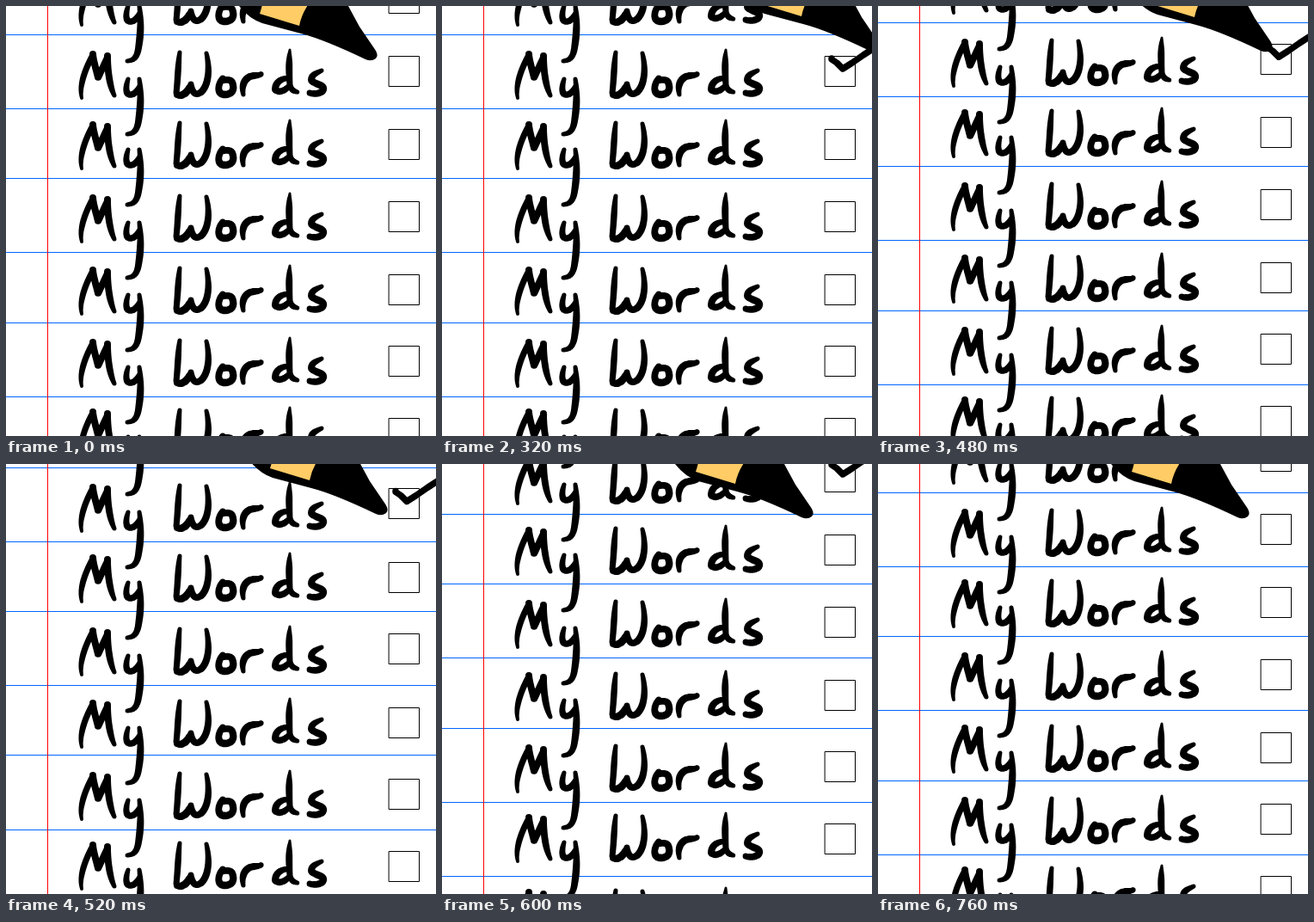
Write an HTML page with a canvas that moves like this. It is 500 px wide and 500 px high and loops after 800 ms.

```html
<!DOCTYPE html>
<html lang="en">
<head>
<meta charset="utf-8">
<title>Checklist</title>
<style>
  html, body { margin: 0; width: 100%; height: 100%; overflow: hidden; background: #fff; }
  canvas { display: block; }
</style>
</head>
<body>
<canvas id="stage" width="500" height="500"></canvas>
<script>
const ctx = document.getElementById('stage').getContext('2d');
const STEP = 40, STEPS = 20, RESET = 19;

const textRows = [-85, 0, 82, 167, 251, 335, 416, 503];
const boxRows = [-26.4, 58, 143.6, 227, 312.6, 395.6, 479.6, 564];
const ruleRows = [-52.4, 33.6, 119.6, 200.6, 286.6, 368, 454.6, 540.6, 621.6];

// Pen offset at each step: approach, tick, return
const penPath = [
  [0, 0], [8, 1], [17, 2], [26, 3], [32, 7], [39, 14], [50, 7], [63, -2],
  [77, -11], [75, -24], [56, -22], [41, -16], [27, -10], [12, -4], [4, -1], [0, 0]
];
const TICK_START = 3, TICK_END = 8;
const TIP = { x: 427, y: 59 };

// Brush strokes: path, then width at start, middle and end
const brush = [
  // M
  ['M88 107 C85 94 91 75 101 57', 4, 7, 7],
  ['M101 56 C102 66 105 74 107 83 C111 75 115 66 118 59', 8, 8, 7],
  ['M118 58 C118 76 121 94 126 104', 8, 8, 5],
  // y
  ['M142 85 C138 98 140 104 146 103 C150 102 153 98 155 94', 5, 7.5, 6],
  ['M155 85 C157 99 157 116 154 134 C152 146 148 148 141 149', 5, 8.5, 5],
  // W
  ['M202 54 C200 68 200 84 198 101', 5, 7.5, 7],
  ['M199 103 C205 106 211 101 215 91', 8, 9, 6],
  ['M215 91 C217 103 222 105 228 99 C236 90 237 72 233 55', 7, 8, 5],
  // o
  ['M252 84 C245 93 246 103 254 103 C264 103 266 96 263 89 C261 85 255 85 249 88', 7, 8.5, 7],
  // r
  ['M276 103 C274 94 276 87 282 83 C287 80 292 82 297 79', 5, 8.5, 6],
  // d
  ['M328 84 C319 84 313 90 313 97 C318 102 325 98 330 92', 6, 8, 6],
  ['M330 51 C329 64 329 78 330 91', 3, 8, 7],
  ['M330 91 C331 97 334 99 339 100', 7, 6.5, 5],
  // s
  ['M367 75 C361 78 355 80 355 86 C359 92 370 91 369 97 C367 102 359 103 353 101', 5, 8.5, 7]
];

const penBody = new Path2D(
  'M225 -40 L271 0 Q283 15 298 20 L343 32 Q370 39 418 62 Q425 65 430 61 ' +
  'Q434 57 428 49 L411 24 L398 0 L385 -40 Z');
const penWood = new Path2D('M295 9 L341 23 Q344 7 356 -8 L365 -30 L300 -30 Q301 -8 295 9 Z');

function paintStroke(g, [d, start, middle, end]) {
  const path = document.createElementNS('http://www.w3.org/2000/svg', 'path');
  path.setAttribute('d', d);
  const length = path.getTotalLength();
  for (let s = 0; s <= length; s += 0.5) {
    const t = s / length;
    const width = t < 0.5
      ? start + (middle - start) * Math.sin(t * Math.PI)
      : end + (middle - end) * Math.sin(t * Math.PI);
    const { x, y } = path.getPointAtLength(s);
    g.moveTo(x + width / 2, y);
    g.arc(x, y, width / 2, 0, 2 * Math.PI);
  }
}

function makeWords() {
  const sheet = document.createElement('canvas');
  sheet.width = 500;
  sheet.height = 160;
  const g = sheet.getContext('2d');
  g.beginPath();
  for (const stroke of brush) paintStroke(g, stroke);
  g.fill();
  return sheet;
}
const words = makeWords();

function scrollAt(step) {
  if (step < 12 || step >= RESET) return 0;
  return -Math.min(29.5 + (step - 13) * 15.75, 84.5);
}

function drawRules(scroll) {
  ctx.fillStyle = '#0066ff';
  for (const y of ruleRows) ctx.fillRect(0, Math.floor(y + scroll), 500, 1);
  ctx.fillStyle = '#ff0000';
  ctx.fillRect(48, 0, 1, 500);
}

function drawTick(step, scroll) {
  if (step < TICK_START || step >= RESET) return;
  const points = penPath.slice(TICK_START, Math.min(step, TICK_END) + 1);
  ctx.lineWidth = 7.5;
  ctx.beginPath();
  ctx.moveTo(TIP.x + 26, TIP.y + 2 + scroll);
  for (const [x, y] of points) ctx.lineTo(TIP.x + x, TIP.y + y + scroll);
  ctx.stroke();
}

function drawPen(step) {
  const [x, y] = penPath[Math.min(step, penPath.length - 1)];
  ctx.save();
  ctx.translate(x, y);
  ctx.fillStyle = '#000';
  ctx.fill(penBody);
  ctx.fillStyle = '#ffcc66';
  ctx.fill(penWood);
  ctx.restore();
}

function draw(step) {
  const scroll = scrollAt(step);
  ctx.fillStyle = '#fff';
  ctx.fillRect(0, 0, 500, 500);
  drawRules(scroll);
  ctx.strokeStyle = '#000';
  ctx.lineCap = ctx.lineJoin = 'round';
  ctx.lineWidth = 1;
  for (const y of boxRows) ctx.strokeRect(445.5, Math.floor(y + scroll) + 0.5, 35, 35);
  for (const y of textRows) ctx.drawImage(words, 0, Math.round(y + scroll));
  drawTick(step, scroll);
  drawPen(step);
}

function tick() {
  draw(Math.floor(performance.now() / STEP) % STEPS);
  requestAnimationFrame(tick);
}
tick();
</script>
</body>
</html>
```
